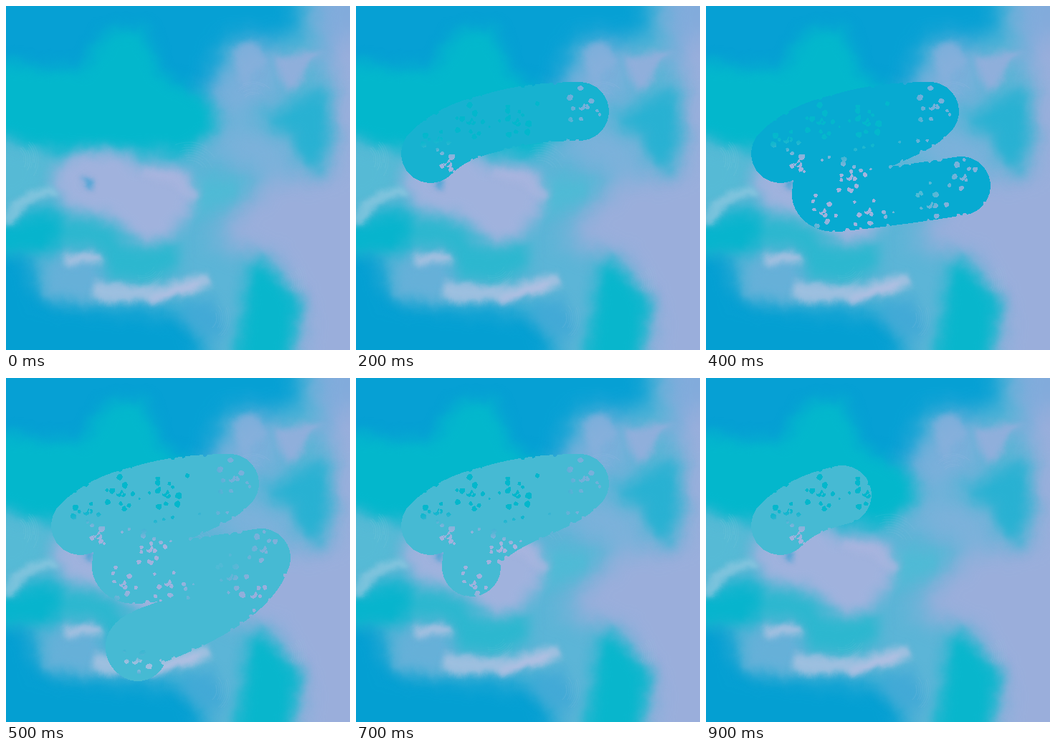
Recreate the animation shown at these times as an HTML page. Size 480 by 480 pixels, loop 1 s.

```html
<!DOCTYPE html>
<html lang="en">
<head>
<meta charset="utf-8">
<title>Painted sky with a brush stroke</title>
<style>
html, body { margin: 0; width: 100%; height: 100%; overflow: hidden; background: #58b4d6; }
svg { position: absolute; inset: 0; width: 100%; height: 100%; display: block; }
#sky { will-change: transform; }
</style>
</head>
<body>
<svg id="sky" viewBox="0 0 480 480">
  <defs>
    <filter id="paint" filterUnits="userSpaceOnUse" x="-50" y="-50" width="580" height="580" color-interpolation-filters="sRGB">
      <feTurbulence type="fractalNoise" baseFrequency=".03" numOctaves="3" seed="4"/>
      <feDisplacementMap in="SourceGraphic" scale="14" xChannelSelector="R" yChannelSelector="G"/>
    </filter>
    <filter id="wide" filterUnits="userSpaceOnUse" x="-90" y="-90" width="660" height="660" color-interpolation-filters="sRGB">
      <feGaussianBlur stdDeviation="16"/>
    </filter>
    <filter id="soft" filterUnits="userSpaceOnUse" x="-90" y="-90" width="660" height="660" color-interpolation-filters="sRGB">
      <feGaussianBlur stdDeviation="10"/>
    </filter>
    <filter id="fine" filterUnits="userSpaceOnUse" x="-90" y="-90" width="660" height="660" color-interpolation-filters="sRGB">
      <feGaussianBlur stdDeviation="5"/>
    </filter>
  </defs>
  <g filter="url(#paint)">
    <rect x="-90" y="-90" width="660" height="660" fill="#5cb5d7"/>
    <g filter="url(#wide)">
      <path fill="#06a0d4" d="M-90-90H420L405 50 310 50 265 150H-90Z"/>
      <path fill="#82abdb" d="M418-90H570V90H440Z"/>
      <path fill="#9aaedb" d="M455 50L570 20V570H400L412 430 375 355 285 325 360 245 455 230Z"/>
      <path fill="#7cb1da" d="M265 185L345 165 410 200 400 245 340 235Z"/>
      <path fill="#7aafda" d="M270 130L340 40 385 70 385 130 300 165Z"/>
      <path fill="#56bad5" d="M-90 170L70 195 60 270-90 320Z"/>
      <path fill="#049fd2" d="M-90 325L35 340 52 405 200 420 265 430 300 570H-90Z"/>
    </g>
    <g filter="url(#soft)">
      <path fill="#03b7cc" d="M-60 75L105 88 140 35 195 32 215 95 285 130 297 172 245 208 140 197 65 205-60 165Z"/>
      <path fill="#28b1d2" d="M355 155L445 112 454 170 435 240 412 215 400 180Z"/>
      <path fill="#07b4cd" d="M-60 318L45 285 80 290 70 345-60 350Z"/>
      <path fill="#2cb7cf" d="M80 292L155 305 165 332 240 330 245 362 200 388 142 380 130 340 70 335Z"/>
      <path fill="#08b6cc" d="M342 350L375 370 412 415 385 540H312Z"/>
      <path fill="#a0b2dd" d="M62 232L110 198 170 205 185 225 240 222 272 262 225 328 185 335 150 295 90 285Z"/>
      <path fill="#66b0d8" d="M60 352L132 347 140 390 118 412 52 410Z"/>
      <path fill="#4fbad5" d="M268 240L325 238 325 268 260 300Z"/>
      <path fill="#42a9d6" d="M235 425L290 410 308 450 290 470Z"/>
    </g>
    <g filter="url(#fine)" fill="none" stroke-linecap="round" stroke-linejoin="round">
      <path fill="#9baedd" opacity=".8" d="M374 72L442 62 396 122Z"/>
      <path fill="#8bafdc" opacity=".7" d="M318 58L346 48 366 75 330 112Z"/>
      <path stroke="#90c8e0" stroke-width="13" opacity=".8" d="M0 300Q25 260 68 258"/>
      <path stroke="#a6c0e0" stroke-width="14" d="M85 353L128 354"/>
      <path stroke="#9dbfdf" stroke-width="22" d="M128 398L200 402 275 386"/>
      <path stroke="#b4bfe2" stroke-width="10" d="M203 410L262 390"/>
      <path stroke="#b0b6e0" stroke-width="16" opacity=".6" d="M195 232L240 240 262 264"/>
      <path stroke="#249fd2" stroke-width="8" d="M110 243L114 251"/>
    </g>
  </g>
  <g id="bristles" fill="none" stroke-width="1.2"></g>
</svg>
<svg viewBox="0 0 480 480">
  <mask id="dry" maskUnits="userSpaceOnUse" x="0" y="0" width="480" height="480">
    <rect width="480" height="480" fill="#fff"/>
    <path id="holes" shape-rendering="crispEdges"/>
  </mask>
  <g mask="url(#dry)">
    <g id="stroke" fill="none" stroke-width="82" stroke-linecap="round" stroke-linejoin="round" shape-rendering="crispEdges">
      <path d="M104 206C125 185 150 172 190 163"/>
      <path d="M190 163C225 152 270 147 312 147"/>
      <path d="M312 147C290 172 240 182 200 208S162 250 161 264"/>
      <path d="M161 264Q166 275 184 274 270 265 356 251"/>
      <path d="M356 251C340 300 265 335 215 355Q168 370 184 382"/>
    </g>
  </g>
</svg>
<script>
let seed = 11;
const rnd = () => (seed = seed * 16807 % 2147483647) / 2147483647;
const byId = id => document.getElementById(id);
const stroke = byId("stroke");
const parts = [...stroke.children];

function blob(x, y, r) {
  const n = 9;
  let d = "";
  for (let i = 0; i < n; i++) {
    const a = i / n * 2 * Math.PI, q = r * (.8 + .4 * rnd());
    d += (i ? "L" : "M") + (x + q * Math.cos(a)).toFixed(1) + " " + (y + q * Math.sin(a)).toFixed(1);
  }
  return d + "Z";
}

const crescent = (x, y, r) =>
  `M${x - r} ${y + r}A${r} ${r} 0 0 0 ${x + r} ${y - r}l-2 1A${r} ${r} 0 0 1 ${x - r} ${y + r - 3}Z`;

// Gaps of the dry brush gather around a few spots: x, y, spread, count
const spots = [
  [112, 186, 20, 7], [158, 160, 24, 9], [222, 160, 24, 9], [315, 140, 28, 9],
  [126, 218, 14, 5], [200, 238, 26, 8], [162, 286, 24, 8], [225, 285, 26, 7],
  [312, 277, 24, 6], [358, 238, 24, 8], [345, 302, 26, 5], [180, 394, 22, 6]
];

function scatter([x, y, spread, count]) {
  let d = crescent(x, y, 4);
  for (let i = 0; i < count; i++) {
    const a = i * 2.4 + rnd(), q = spread * Math.sqrt((i + .7) / count);
    d += blob(x + q * Math.cos(a), y + q * Math.sin(a), 2.3 + 2.3 * rnd());
  }
  return d;
}

// Small bites along both borders of a stroke part
function fray(path) {
  const len = path.getTotalLength();
  let d = "";
  for (let s = 8; s < len; s += 14) {
    const p = path.getPointAtLength(s), q = path.getPointAtLength(s + 1);
    const side = rnd() < .5 ? -41 : 41, l = Math.hypot(q.x - p.x, q.y - p.y) || 1;
    d += blob(p.x - (q.y - p.y) / l * side, p.y + (q.x - p.x) / l * side, 1.5 + 2 * rnd());
  }
  return d;
}

byId("holes").setAttribute("d", spots.map(scatter).join("") + parts.map(fray).join(""));

// Faint arcs of bristle marks around a centre
function bristles(x, y, r, from, color) {
  let marks = "";
  for (let i = 0; i < 8; i++) {
    const q = r * (.5 + i / 14), a = from + rnd() * .4, b = a + .8 + rnd() * .5;
    marks += `<path d="M${x + q * Math.cos(a)} ${y + q * Math.sin(a)}A${q} ${q} 0 0 1 ${x + q * Math.cos(b)} ${y + q * Math.sin(b)}" stroke="${color}" opacity="${.08 + .1 * rnd()}"/>`;
  }
  return marks;
}
byId("bristles").innerHTML =
  bristles(5, 215, 40, -.9, "#a4dce6") + bristles(255, 240, 50, -2, "#9fd2e6") +
  bristles(345, 140, 34, -2.4, "#a9bfe4") + bristles(275, 435, 38, -.7, "#a0cbe6") +
  bristles(380, 385, 40, -.8, "#9fcbe2") + bristles(190, 355, 38, .4, "#6ed0da");

const main = "#46bad3";
const tints = [main, main, "#17b2d0", "#68a9d9", "#07aad1"];
let shown = -1;

// The stroke gains one part per step, then loses them again
function draw(ms) {
  const step = Math.floor(ms % 1000 / 100);
  if (step === shown) return;
  shown = step;
  const reach = 5 - Math.abs(5 - step);
  stroke.setAttribute("stroke", tints[step] || main);
  parts.forEach((part, i) => { part.style.display = i < reach ? "" : "none"; });
}

const start = performance.now();
function tick() {
  draw(performance.now() - start);
  requestAnimationFrame(tick);
}
tick();
</script>
</body>
</html>
```
